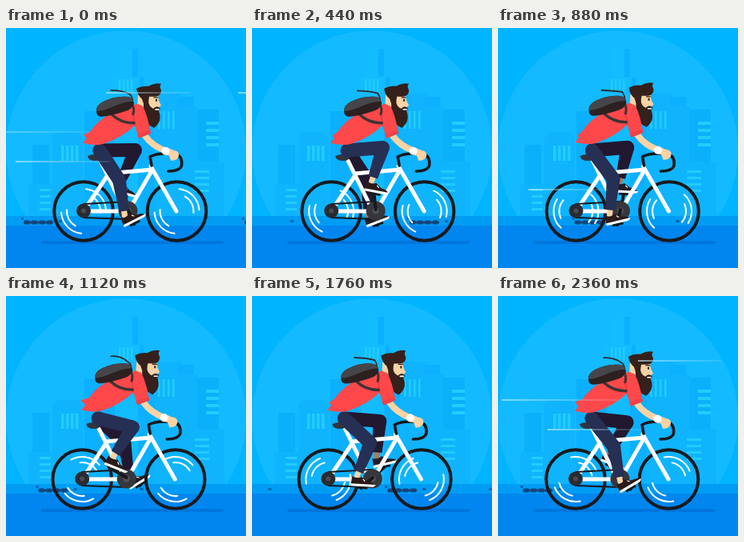
An HTML page with a canvas that plays this animation: 300x300 px, repeating every 2400 ms.

```html
<!DOCTYPE html>
<html lang="en">
<head>
<meta charset="utf-8">
<title>Cyclist</title>
<style>
  html, body { margin: 0; width: 100%; height: 100%; overflow: hidden; background: #00b4ff; }
  canvas { display: block; width: 300px; height: 300px; }
</style>
</head>
<body>
<canvas id="stage" width="300" height="300"></canvas>
<script>
const ctx = document.getElementById('stage').getContext('2d');
const LOOP = 2400, STEP = 40, TURN = 800, TAU = Math.PI * 2, RAD = Math.PI / 180;
const BLACK = '#17191d', WHITE = '#fff', SKIN = '#fad3a4', RED = '#ff484a', HAIR = '#35201b';
const HUB_Y = 229, REAR_X = 97, FRONT_X = 213.5;
const CRANK = { x: 152.5, y: 227, r: 19.5 };

const fill = (d, color) => { ctx.fillStyle = color; ctx.fill(new Path2D(d)); };
const stroke = (d, color, width) => {
  ctx.strokeStyle = color;
  ctx.lineWidth = width;
  ctx.stroke(new Path2D(d));
};
const rect = (x, y, w, h, color) => { ctx.fillStyle = color; ctx.fillRect(x, y, w, h); };
const disc = (x, y, r, color) => {
  ctx.fillStyle = color;
  ctx.beginPath();
  ctx.arc(x, y, r, 0, TAU);
  ctx.fill();
};
const arc = (x, y, r, from, to, color, width) => {
  ctx.strokeStyle = color;
  ctx.lineWidth = width;
  ctx.beginPath();
  ctx.arc(x, y, r, from, to);
  ctx.stroke();
};
const at = (x, y, angle, draw) => {
  ctx.save();
  ctx.translate(x, y);
  ctx.rotate(angle);
  draw();
  ctx.restore();
};

// Slow drift of bike and rider: [time, offset], eased between points
const DRIFT = [[0, 0], [560, 2.4], [1320, -2.6], [LOOP, 0]];
function drift(t) {
  const i = DRIFT.findIndex(([time]) => t < time);
  const [t0, a] = DRIFT[i - 1], [t1, b] = DRIFT[i];
  return a + (b - a) * (1 - Math.cos(Math.PI * (t - t0) / (t1 - t0))) / 2;
}

function scenery() {
  rect(0, 0, 300, 300, '#00b4ff');
  disc(150, 153, 150, '#14baff');
  const shade = '#0cb0ff', back = '#13bbff', mid = '#10b4fd', front = '#0bb0fa', glass = '#22ccff';
  rect(150, 26, 15, 40, shade);
  rect(143, 26, 15, 40, back);
  rect(150, 61, 22, 175, shade);
  rect(133, 61, 34, 175, back);
  rect(165, 112, 26, 124, shade);
  rect(185, 82, 34, 154, mid);
  rect(215, 86, 20, 150, shade);
  rect(98, 104, 38, 132, shade);
  rect(205, 98, 35, 138, mid);
  rect(239, 102, 27, 134, front);
  rect(33, 146, 21, 90, front);
  fill('M58 236V138Q58 130 66 130H86Q95 130 96 140V236Z', mid);
  rect(28, 195, 70, 41, mid);
  rect(232, 167, 41, 69, mid);
  for (let i = 0; i < 4; i++) {
    rect(141 + i * 5, 64, 2.5, 16, glass);
    rect(69 + i * 6, 147, 3.5, 19, glass);
    rect(190 + i * 6, 104, 2.5, 22, glass);
    rect(250, 117 + i * 9, 16, 4, glass);
    rect(42, 201 + i * 8, 14, 3, glass);
    rect(236, 178 + i * 8, 18, 3, glass);
  }
  rect(0, 235, 300, 65, '#0086ee');
  rect(0, 235, 300, 12, '#009cf4');
  ctx.lineCap = 'round';
  stroke('M46 268H270', '#0076dc', 4);
}

function roadMarks(t) {
  for (let k = 0; k < 4; k++) {
    const x = 22 + k * 276 - t * 0.23;
    rect(x, 241.5, 37, 3, '#12457c');
    for (let i = 0; i < 4; i++) rect(x + 1 + i * 9.5, 240.5, 6, 5, '#12457c');
    rect(x - 3, 237, 3, 3, '#0763b4');
    rect(x + 44, 240, 4, 3, '#0763b4');
    rect(x + 127, 240, 4, 3, '#0763b4');
  }
}

function wheel(x, spin) {
  arc(x, HUB_Y, 36.8, 0, TAU, BLACK, 4);
  for (const side of [0, Math.PI]) {
    const a = spin + side;
    arc(x, HUB_Y, 28, a - 0.8, a + 0.6, WHITE, 2);
    arc(x, HUB_Y, 21, a - 0.4, a + 0.75, WHITE, 2);
  }
}

function bike(spin) {
  wheel(REAR_X, spin);
  wheel(FRONT_X, spin);
  ctx.lineCap = ctx.lineJoin = 'round';
  stroke('M118 166L149 229M126 182L183 177L153 229H97L127 184', WHITE, 5);
  stroke('M181 173L213 229', WHITE, 5);
  fill('M102 160Q110 156 120 160Q120 166 112 166Q103 166 102 160Z', '#31353f');
  stroke('M182 172L180 161Q187 157 199 157H210Q221 159 219.5 172Q217 179 203 179', BLACK, 3.6);
  stroke('M97 220L152 217M97 237L152 239', BLACK, 2);
  disc(REAR_X, 228.5, 9, '#292b30');
  disc(REAR_X, 228.5, 3, '#484b52');
  disc(CRANK.x, 228.5, 12, '#36373c');
  disc(CRANK.x, 228.5, 4, '#505258');
}

function leg(angle, near) {
  const px = CRANK.x + CRANK.r * Math.cos(angle), py = CRANK.y + CRANK.r * Math.sin(angle);
  const tilt = (-5 + 27 * Math.cos(angle - 210 * RAD)) * RAD;
  const ax = px - 6 * Math.cos(tilt) + 15 * Math.sin(tilt);
  const ay = py - 6 * Math.sin(tilt) - 15 * Math.cos(tilt);

  // Two equal bones, knee forward
  const hx = 117, hy = 153, bone = 44.5;
  const dx = ax - hx, dy = ay - hy, d = Math.hypot(dx, dy);
  const bend = Math.sqrt(Math.max(0, bone * bone - d * d / 4)) / d;
  const kx = hx + dx / 2 + dy * bend, ky = hy + dy / 2 - dx * bend;
  const mix = (a, b, f) => a + (b - a) * f;

  ctx.lineCap = ctx.lineJoin = 'round';
  stroke(`M${CRANK.x} ${CRANK.y}L${px} ${py}`, BLACK, 4);
  stroke(`M${mix(kx, ax, 0.6)} ${mix(ky, ay, 0.6)}L${ax} ${ay}`, near ? SKIN : '#a87a5e', 7);
  at(px, py, tilt, () => {
    rect(-6, -2, 14, 3, BLACK);
    fill('M-13 -4L-12 -14Q-5 -11 0 -14L7 -9Q16 -8 17 -4Z', near ? '#2b1a1a' : '#241c22');
    fill('M-13 -5H18Q17 -2 14 -2H-13Z', WHITE);
    stroke('M2 -11L4 -9', WHITE, 1.2);
  });
  const cloth = near ? '#262f54' : '#22182f';
  stroke(`M${hx} ${hy}L${kx} ${ky}`, cloth, 17);
  at(kx, ky, Math.atan2(ay - ky, ax - kx), () => {
    fill(`M0 -8.5L${bone * 0.88} -6V6L0 8.5Z`, cloth);
  });
}

function torso(t) {
  const wave = Math.sin(t / 400 * TAU) * 2;
  fill(`M150 99L126 110Q112 119 106 129L${97 + wave} ${134 + wave}L101 138L96 144Q112 148 122 145
    Q146 137 161 122L166 138L181 132Q177 109 171 98L164 95Z`, RED);
  stroke('M161 122Q161 112 157 106', '#d8333f', 1.2);
  fill('M164 133L180 128L181 132L166 138Z', '#ee4049');

  ctx.lineCap = 'round';
  stroke('M132 108Q143 119 160 119', '#3c3534', 3.5);
  stroke('M157 94Q161 100 159 108', '#3c3534', 3);
  stroke(`M${131 - wave} ${78 + wave / 2}Q146 ${78 + wave} 155 ${83 - wave}Q158 86 158 91`, '#2b2b2f', 1.8);
  fill('M113 105Q112 97 122 92Q136 85 150 86Q159 86 160 94Q158 102 150 104Q132 110 120 111Q113 111 113 105Z',
    '#2c2021');
  fill('M113 104Q113 96 122 92Q136 85 150 86Q158 86 159 92Q148 92 135 98Q122 104 113 104Z', '#46464a');
}

function head() {
  fill('M167 84H192L193 91L196 97L192 100L190 107L179 108L174 110L166 101Z', SKIN);
  fill('M174 91L180 91Q180 98 186 101Q191 96 195 101L193 104Q198 117 187 125Q175 120 174 107Z', HAIR);
  fill(`M165 76Q172 72 180 73Q188 68 196 70Q193 73 196 78Q196 85 189 86H181L180 93L174 95
    L172 89Q166 84 165 76Z`, HAIR);
  rect(189, 89, 2, 3, HAIR);
  stroke('M187 87H192', HAIR, 1.3);
  stroke('M189 102H193', WHITE, 1.6);
}

function arm() {
  ctx.lineCap = 'round';
  stroke('M174 135Q182 147 200 154', SKIN, 8);
  fill('M200 149L209 153Q217 154 216 160Q215 166 206 166L204 160L198 158Z', SKIN);
  disc(199.5, 154, 5, WHITE);
}

// Wind streaks: [moment, left edge then, y, length]
const STREAKS = [
  [0, -45, 130, 150], [0, 125, 81, 105], [0, 12, 167, 118], [240, -10, 81, 112],
  [600, 145, 188, 95], [600, 184, 201, 125], [880, 38, 202, 100],
  [1400, 292, 204, 110], [1400, 245, 256, 110]
];
function wind(t) {
  for (const [moment, left, y, length] of STREAKS) {
    const away = ((t - moment + LOOP * 1.5) % LOOP) - LOOP / 2;
    const x = left - away * 1.25;
    if (x > 300 || x + length < 0) continue;
    const fade = ctx.createLinearGradient(x, 0, x + length, 0);
    fade.addColorStop(0, 'rgba(190,235,255,.65)');
    fade.addColorStop(1, 'rgba(190,235,255,.25)');
    fill(`M${x} ${y - 1}L${x + length} ${y - 0.5}V${y + 0.5}L${x} ${y + 1}Z`, fade);
  }
}

function draw(t) {
  const turn = t / TURN * TAU, pedal = turn + 66 * RAD;
  scenery();
  roadMarks(t);
  ctx.save();
  ctx.translate(drift(t), 0);
  leg(pedal + Math.PI, false);
  bike(turn - 38 * RAD);
  leg(pedal, true);
  ctx.translate(0, Math.cos((t - 200) / LOOP * TAU) - 1);
  arm();
  at(-2, 0, 0, head);
  torso(t);
  ctx.restore();
  wind(t);
}

function frame() {
  draw(Math.floor(performance.now() % LOOP / STEP) * STEP);
  requestAnimationFrame(frame);
}
frame();
</script>
</body>
</html>
```
